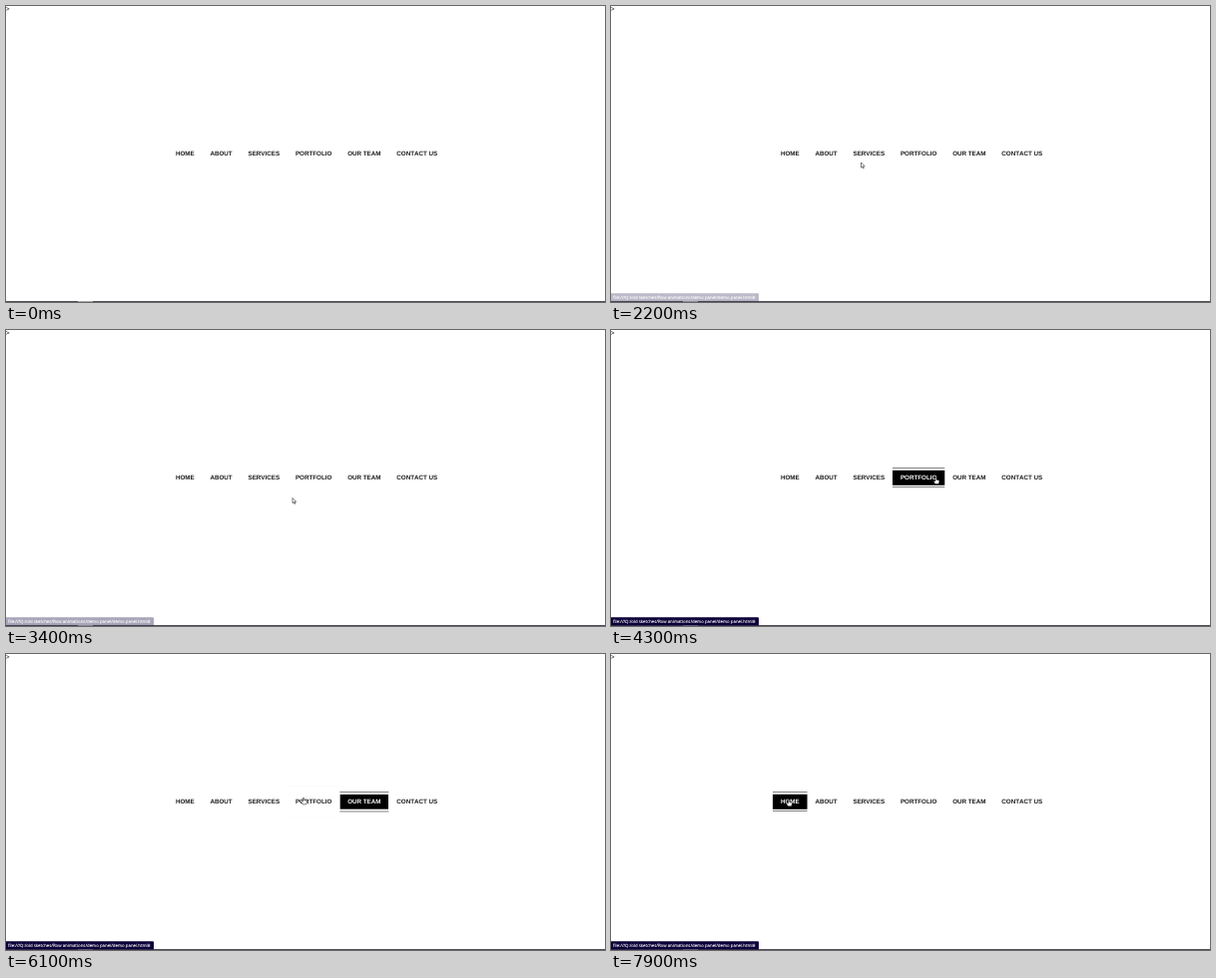
These frames come from a looping animation (600x297 px, 8.8 s). An HTML page:

```html
<!DOCTYPE html>
<html lang="en">
<head>
<meta charset="utf-8">
<title>Menu hover</title>
<style>
  html, body { margin: 0; width: 100%; height: 100%; overflow: hidden; background: #fff; }
  svg { display: block; width: 600px; height: 297px; }
  text { text-rendering: geometricPrecision; white-space: pre; }
  .label { font: bold 6.25px "Liberation Sans", Arial, sans-serif; font-kerning: none; }
  .path { font: 4.37px "Open Sans", sans-serif; fill: #fff; stroke: #fff; stroke-width: .1; }
  .stray { font: 6.5px "Liberation Sans", Arial, sans-serif; }
  #cursor path { fill: #fff; stroke: #000; stroke-width: .5; stroke-linejoin: round; }
</style>
</head>
<body>
<svg viewBox="0 0 600 297">
  <text class="stray" x="-.3" y="4.9">&gt;</text>
  <g id="menu"></g>
  <path d="M0 296H600V297H0Z" fill="#564f5b"/>
  <path d="M72 296H87V297H72Z" fill="#aaa6ae"/>
  <g id="status">
    <path d="M0 288.3H147Q148 288.3 148 289.3V296.5H0Z" fill="#0c0038"/>
    <text class="path" x="2" y="294">file:///Q:/old sketches/Row animations/demo panel/demo panel.html#</text>
  </g>
  <g id="cursor">
    <path id="arrow" d="M0 0V5.2L1.2 4.1L2 6L2.8 5.7L2 3.8H3.7Z"/>
    <path id="hand" d="M-.6.5Q0-.4.6.5V2.6L2.9 3.1Q3.5 3.3 3.4 4.3L2.8 6.8H-.8L-2.4 4.2Q-2.4 3.2-.6 4Z"/>
  </g>
</svg>
<script>
const LOOP = 8800, STEP = 100, FADE = 500, MID = 148.3, PAD = 7.9;
const labels = ["HOME", "ABOUT", "SERVICES", "PORTFOLIO", "OUR TEAM", "CONTACT US"];

// [time, x, y] of the pointer tip; hovering follows from it
const route = [
  [200, 196, 260], [600, 178, 147], [900, 180, 148], [1400, 222, 149], [1600, 225, 150],
  [1950, 238, 177], [2200, 250.5, 157], [2500, 258, 147], [3400, 287, 168.5],
  [4000, 306, 148], [4800, 358, 147], [5100, 411, 147.5], [5300, 411, 147.5],
  [6080, 336, 146], [6100, 298, 144], [6600, 262, 149], [6950, 222, 172], [7500, 178, 146]
];

const $ = id => document.getElementById(id);
const clamp = v => Math.max(0, Math.min(1, v));
const mix = (a, b, k) => a + (b - a) * k;

function set(el, attrs) {
  for (const key in attrs) el.setAttribute(key, attrs[key]);
}
function add(name, attrs) {
  const el = document.createElementNS("http://www.w3.org/2000/svg", name);
  set(el, attrs);
  return $("menu").appendChild(el);
}

let edge = 162;
const links = labels.map(label => {
  const lines = add("path", {}), box = add("rect", {});
  const text = add("text", { class: "label", x: edge + PAD, y: 150.4 });
  text.textContent = label;
  const left = edge, width = text.getComputedTextLength() + 2 * PAD;
  edge += width;
  return { lines, box, text, left, width };
});

function pointer(t) {
  const next = route.findIndex(stop => stop[0] > t);
  const b = route.at(next), a = route[Math.max(0, next - 1)] ;
  if (next < 0) return b.slice(1);
  const k = clamp((t - a[0]) / (b[0] - a[0]));
  return [mix(a[1], b[1], k), mix(a[2], b[2], k)];
}

function linkAt([x, y]) {
  if (Math.abs(y - 148.5) > 8) return -1;
  return links.findIndex(({ left, width }) => x >= left && x < left + width);
}

// Each change of the hovered link along the route
const hovers = [{ time: -LOOP, link: -1 }];
for (let time = 0; time < LOOP; time += 5) {
  const link = linkAt(pointer(time));
  if (link !== hovers.at(-1).link) hovers.push({ time, link });
}

// The standard CSS "ease" curve
function ease(x) {
  if (x <= 0 || x >= 1) return clamp(x);
  const bezier = (a, b, s) => 3 * a * s * (1 - s) ** 2 + 3 * b * s * s * (1 - s) + s ** 3;
  let lo = 0, hi = 1;
  for (let n = 0; n < 20; n++) {
    const s = (lo + hi) / 2;
    if (bezier(.25, .25, s) < x) lo = s; else hi = s;
  }
  return bezier(.1, 1, lo);
}

function progress(link, past, t) {
  let from = 0, to = 0, start = 0;
  const value = now => mix(from, to, ease((now - start) / FADE));
  for (const hover of past) {
    const goal = +(hover.link === link);
    if (goal !== to) [from, to, start] = [value(hover.time), goal, hover.time];
  }
  return value(t);
}

function drawLink({ lines, box, text, left, width }, p) {
  const stretch = mix(2, 1.2, p), half = 8.1 * stretch, thick = .38 * stretch;
  const bar = y => `M${left} ${y}h${width}v${thick}h${-width}z`;
  set(lines, { d: bar(MID - half) + bar(MID + half - thick), opacity: p });
  set(box, { x: left + width * (1 - p) / 2, y: MID - 7.5 * p, width: width * p, height: 15 * p });
  const c = Math.round(mix(28, 255, p));
  set(text, { fill: `rgb(${c},${c},${c})` });
}

// The address fades in at the first hover and out a while after leaving
function statusOpacity(past, t) {
  const { time, link } = past.at(-1);
  if (past.length < 2) return 0;
  return link < 0 ? clamp(1 - (t - time - 370) / 200) : clamp((t - past[1].time) / 200);
}

function draw() {
  const t = Math.floor(performance.now() % LOOP / STEP) * STEP;
  const past = hovers.filter(hover => hover.time <= t);
  const over = past.at(-1).link >= 0;
  links.forEach((link, i) => drawLink(link, progress(i, past, t)));
  set($("status"), { opacity: statusOpacity(past, t) });
  set($("cursor"), { transform: `translate(${pointer(t)})`, opacity: +(t >= route[0][0]) });
  set($("hand"), { opacity: +over });
  set($("arrow"), { opacity: +!over });
  requestAnimationFrame(draw);
}
draw();
</script>
</body>
</html>
```
